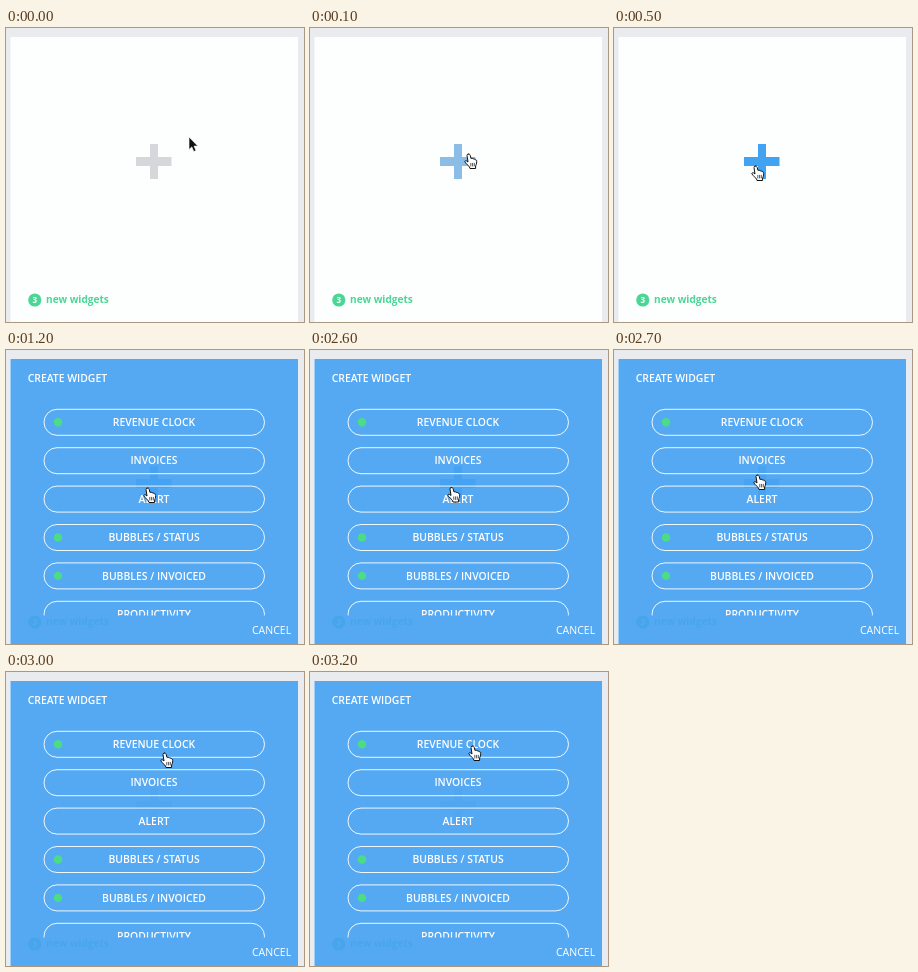
These frames come from a looping animation (298 by 294 pixels, 3800 ms). An HTML page:

```html
<!DOCTYPE html>
<html lang="en">
<head>
<meta charset="utf-8">
<title>Create widget</title>
<style>
  html, body { margin: 0; width: 100%; height: 100%; overflow: hidden; background: #e9ebef; }
  svg { display: block; }
  text { font: 600 10.4px "Open Sans", sans-serif; fill: #fff; }
  .count { font-weight: 700; font-size: 10.1px; fill: #4cd696; }
  .badge { font-weight: 700; font-size: 8px; fill: #fff; text-anchor: middle; }
  .cancel { font-weight: 400; font-size: 10.5px; }
  #list text { text-anchor: middle; }
  #list rect { fill: none; stroke: #fff; stroke-opacity: .9; }
  #list circle { fill: #4bdc84; }
</style>
</head>
<body>
<svg width="298" height="294" viewBox="0 0 298 294">
  <clipPath id="view"><rect x="4" y="40" width="288" height="225.5"/></clipPath>

  <rect x="4.5" y="9" width="287.5" height="285" fill="#fdfffe"/>
  <path id="plus" d="M144 116h8v13h13.5v9H152v13h-8v-13h-14v-9h14z"/>
  <circle cx="28.8" cy="272" r="6.6" fill="#4cd696"/>
  <text class="badge" x="28.8" y="275">3</text>
  <text class="count" x="40" y="275">new widgets</text>

  <g id="menu">
    <rect x="4.5" y="9" width="287.5" height="285" fill="#47a2f2" fill-opacity=".92"/>
    <text x="21.7" y="32">CREATE WIDGET</text>
    <g id="list" clip-path="url(#view)"></g>
    <text class="cancel" x="246" y="283.8">CANCEL</text>
  </g>

  <path id="arrow" d="M183 109v12.5l2.8-2.6 2 4.7 2.2-1-2-4.5h3.8z" fill="#111" stroke="#fff" stroke-width=".6"/>
  <g id="hand" stroke="#111" stroke-linejoin="round" stroke-linecap="round">
    <path fill="#fff" d="M4 1.2C5.2.6 6 1.4 6.2 2.4L7 5.5C8 5 9 5.3 9.2 6 10 5.7 11 6 11.2 6.8 12.2 6.5 12.8 7.2 12.7 8.5 12.7 11 12 12 11.6 13V15.5H6L5.5 14C4 12.5 3 11 1 9.3.3 8.4 1.3 7.4 2.5 7.9L4 9 3 2.6C2.9 2 3.2 1.4 4 1.2Z"/>
    <path fill="none" stroke-width=".7" d="M6.8 10.3v2.7M8.6 10.3v2.7M10.3 10.3v2.7"/>
  </g>
</svg>
<script>
  const LOOP = 3800, MENU_AT = 1200;
  const $ = id => document.getElementById(id);

  // label, has a new-item dot
  const items = [
    ["REVENUE CLOCK", 1], ["INVOICES", 0], ["ALERT", 0],
    ["BUBBLES / STATUS", 1], ["BUBBLES / INVOICED", 1], ["PRODUCTIVITY", 0]
  ];
  $("list").innerHTML = items.map(([label, dot], i) => {
    const y = 72.3 + i * 38.4;
    return `<rect x="38" y="${y - 13}" width="220.5" height="26" rx="13"/>` +
      (dot ? `<circle cx="52" cy="${y}" r="4.2"/>` : "") +
      `<text x="148" y="${y + 3.6}">${label}</text>`;
  }).join("");

  // time, hand x, hand y, hover amount of the plus
  const steps = [
    [0, 180, 108, 0], [100, 154, 125, .5], [200, 137, 137, 1],
    [2600, 137, 136.5, 1], [2700, 139, 124, .7], [2800, 142, 108, .2],
    [2900, 149, 92, 0], [3000, 154, 80, 0], [3100, 157, 74, 0], [3200, 158, 73, 0]
  ];
  const grey = [213, 215, 218], blue = [66, 163, 242];
  const mix = k => `rgb(${grey.map((g, i) => Math.round(g + (blue[i] - g) * k))})`;
  const show = (id, on) => $(id).style.display = on ? "" : "none";

  function draw(now) {
    const t = now % LOOP;
    const [at, x, y, hover] = steps.filter(s => s[0] <= t).pop();
    $("plus").setAttribute("fill", mix(hover));
    $("hand").setAttribute("transform", `translate(${x} ${y})`);
    show("arrow", at === 0);
    show("hand", at > 0);
    show("menu", t >= MENU_AT);
  }

  const start = performance.now();
  function tick() {
    draw(performance.now() - start);
    requestAnimationFrame(tick);
  }
  tick();
</script>
</body>
</html>
```
